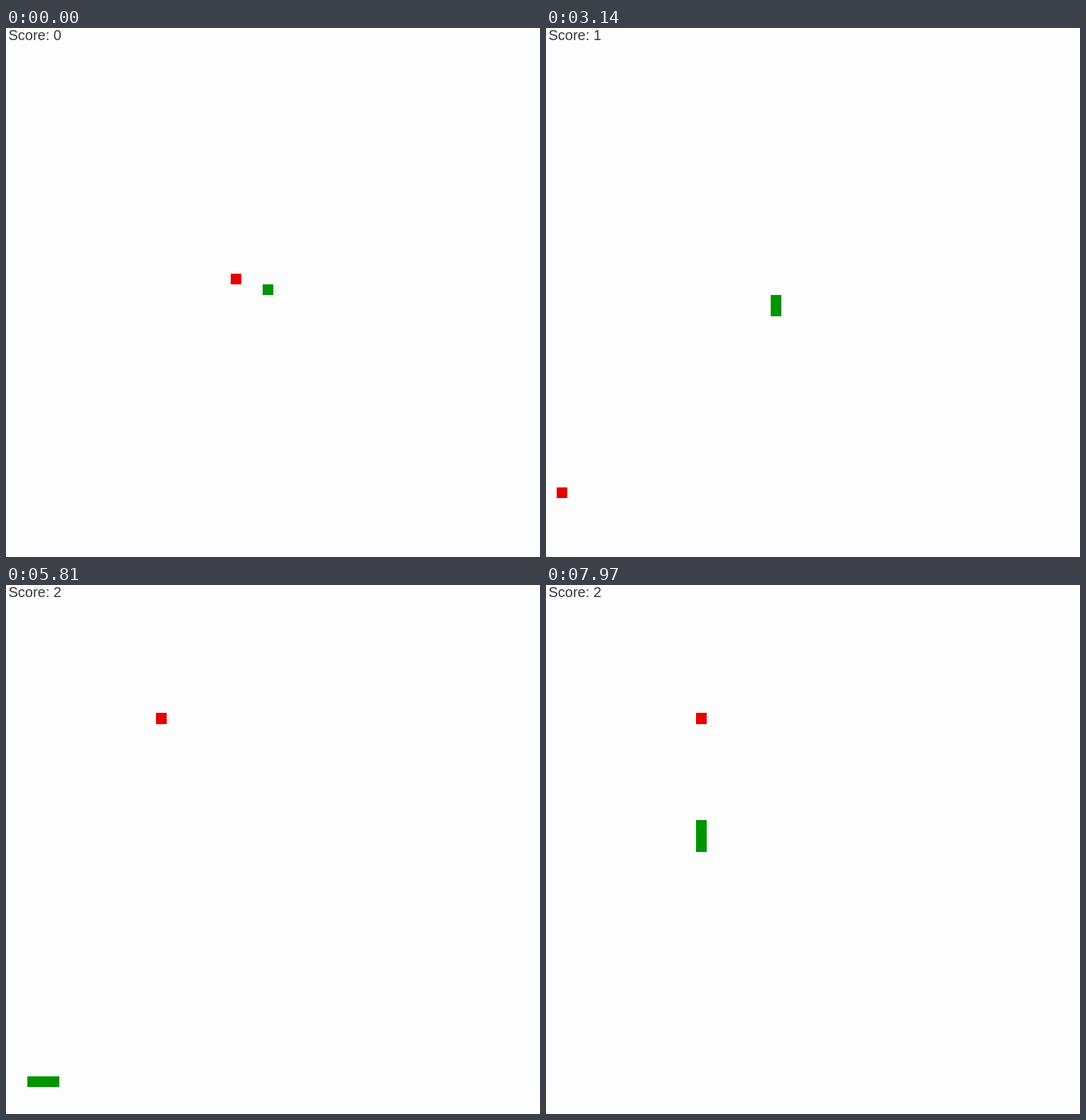
An HTML page that plays this animation: 751 px wide and 745 px high, repeating every 8000 ms.

```html
<!DOCTYPE html>
<html lang="en">
<head>
<meta charset="utf-8">
<title>Snake</title>
<style>
  html, body { margin: 0; width: 100%; height: 100%; overflow: hidden; background: #fdfdfd; }
  svg { display: block; width: 751px; height: 745px; }
  text { font: 20px "Liberation Sans", Arial, sans-serif; fill: #383838; }
  #food { fill: #e60000; }
  #snake rect { fill: #009400; }
</style>
</head>
<body>
<svg viewBox="0 0 751 745">
  <rect id="food"/>
  <g id="snake"><rect/><rect/><rect/></g>
  <text id="score" x="3.5" y="17">Score: 0</text>
</svg>
<script>
  const LOOP = 8000, TICK = 62.5, FIRST_MOVE = 1240, PITCH = 15.04;

  // Corners of the head's route, in grid cells.
  const corners = [
    [24, 24], [24, 21], [20, 21], [20, 25], [25, 25], [25, 20],
    [21, 20], [21, 34], [1, 34], [1, 46], [14, 46], [14, 22]
  ];
  const foods = [[21, 23], [1, 43], [14, 12]];

  const route = [corners[0]];
  for (const [x, y] of corners.slice(1)) {
    let [cx, cy] = route[route.length - 1];
    while (cx !== x || cy !== y) {
      cx += Math.sign(x - cx);
      cy += Math.sign(y - cy);
      route.push([cx, cy]);
    }
  }

  // The snake grows on the tick after its head reaches the food.
  const meals = foods.slice(0, 2).map(([fx, fy]) =>
    route.findIndex(([x, y]) => x === fx && y === fy) + 1);

  const food = document.getElementById("food");
  const segments = [...document.querySelectorAll("#snake rect")];
  const score = document.getElementById("score");

  function place(rect, [col, row]) {
    const x = Math.round(col * PITCH), y = Math.round(row * PITCH);
    rect.setAttribute("x", x);
    rect.setAttribute("y", y);
    rect.setAttribute("width", Math.round((col + 1) * PITCH) - x);
    rect.setAttribute("height", Math.round((row + 1) * PITCH) - y);
  }

  function draw(time) {
    const moves = Math.floor((time - FIRST_MOVE) / TICK) + 1;
    const step = Math.max(0, Math.min(moves, route.length - 1));
    const eaten = meals.filter(meal => step >= meal).length;
    place(food, foods[eaten]);
    segments.forEach((segment, i) =>
      place(segment, route[Math.max(0, step - Math.min(i, eaten))]));
    score.textContent = "Score: " + eaten;
  }

  const start = performance.now();
  function frame() {
    draw((performance.now() - start) % LOOP);
    requestAnimationFrame(frame);
  }
  draw(0);
  requestAnimationFrame(frame);
</script>
</body>
</html>
```
